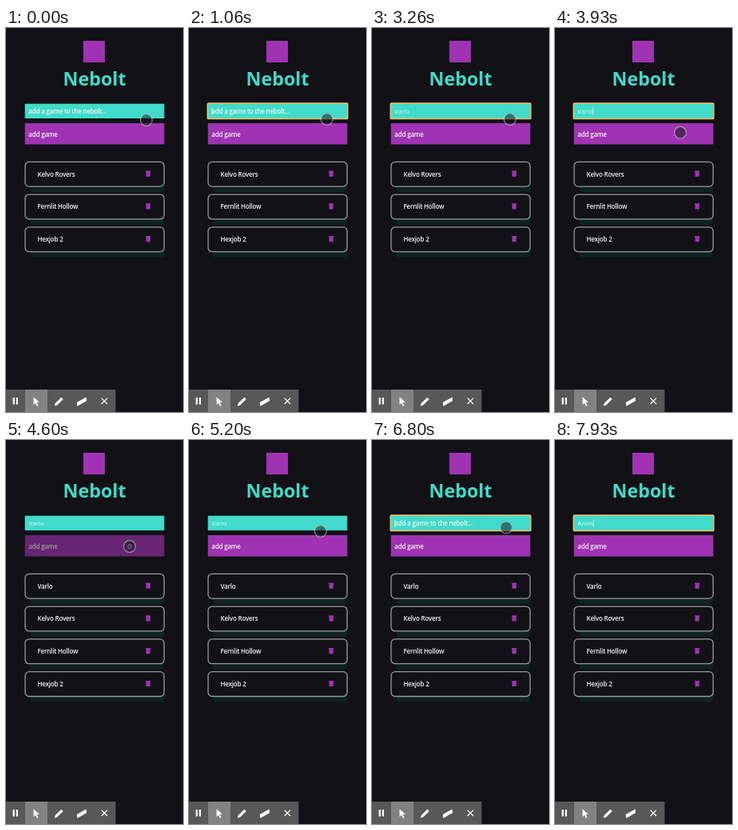
An HTML page for the animation above (8 s loop, 222 px wide and 480 px high).

```html
<!DOCTYPE html>
<html lang="en">
<head>
<meta charset="utf-8">
<title>Game list</title>
<style>
  html, body { margin: 0; width: 100%; height: 100%; overflow: hidden; background: #111116; }
  svg { display: block; width: 100vw; height: 100vh; }
  text { font: 600 8px "Open Sans", "Noto Sans", sans-serif; letter-spacing: -.2px; fill: #f4f4f6; }
  #title { font-size: 23.3px; font-weight: 700; letter-spacing: 0; fill: #40dbca; text-anchor: middle; }
  #field.typed { font-weight: 400; letter-spacing: 0; fill: #e0fbf7; }
</style>
</head>
<body>
<svg viewBox="0 0 222 480">
  <defs>
    <filter id="soft" x="-10%" y="-30%" width="120%" height="160%"><feGaussianBlur stdDeviation=".7"/></filter>
    <g id="card">
      <rect x="30.5" y="10" width="168" height="28" rx="3" fill="#10231f" filter="url(#soft)"/>
      <rect x="24" y=".3" width="174.3" height="30.8" rx="5" fill="#111116" stroke="#969b9b" stroke-width="1.3"/>
      <path d="M175.2 11.5h6.2v1.4h-.5v5.8h-5.2v-5.8h-.5z" fill="#a033b3"/>
    </g>
  </defs>
  <rect width="222" height="480" fill="#111116"/>
  <rect x="97" y="16" width="27" height="27" fill="#a033b3"/>
  <text id="title" x="111" y="72">Nebolt</text>

  <rect x="23.7" y="94.7" width="174.8" height="18.3" fill="#40dbca"/>
  <rect id="focus" x="23.3" y="94.2" width="175.7" height="19.2" rx="1" fill="none" stroke="#e3c06c" stroke-width="1.7"/>
  <text id="field" x="28.3" y="107"></text>
  <rect id="caret" y="99.5" width=".8" height="9" fill="#e0fbf7"/>

  <g id="button">
    <rect x="23.7" y="119" width="174.8" height="26.5" fill="#a033b3"/>
    <text x="28.3" y="135.5">add game</text>
  </g>

  <g id="list"></g>

  <g id="toolbar">
    <rect y="452" width="137.5" height="28" fill="#585858"/>
    <rect x="24" y="452" width="28" height="28" fill="#828282"/>
    <g fill="#fff">
      <path d="M8.6 462h2.2v8.5h-2.2zM12.7 462h2.2v8.5h-2.2z"/>
      <path d="M34.5 461.3l7.3 6.4-3.3.4 2 3.8-1.6.8-1.9-3.9-2.4 2.2z"/>
      <path d="M60.8 472.5l1-3.4 7.6-7.3 2.3 2.3-7.6 7.4z"/>
      <path d="M88.8 468l11.8-6.6.6 4.6-11.8 6.8z"/>
    </g>
    <path d="M119.7 462.6l7.4 7.4M127.1 462.6l-7.4 7.4" stroke="#fff" stroke-width="1.2"/>
  </g>

  <g id="pointer">
    <circle r="7.4" fill="#111820" fill-opacity=".52" stroke="#c8c4cc" stroke-opacity=".65" stroke-width="1.2"/>
    <circle id="press" fill="none" stroke="#c8b4cc"/>
  </g>
</svg>
<script>
const LOOP = 8000;
const HINT = "add a game to the nebolt...";
const NEW = "Varlo", NEXT = "Anim";
const GAMES = ["Kelvo Rovers", "Fernlit Hollow", "Hexjob 2"];

// key moments in ms
const FOCUS = 600, TYPE = 2270, PRESS = 4270, ADD = 4530, LEAVE = 5060;
const REFOCUS = 5800, ERASE = 6330, RETYPE = 7600;
const KEY_GAP = 120, NEXT_GAP = 105, ERASE_GAP = 65;

const START = { x: 176, y: 115 };
const MOVES = [
  { from: 0, to: 400, x: 173, y: 114 },
  { from: 3460, to: 4060, x: 155, y: 133 },
  { from: LEAVE, to: 5200, x: 165, y: 114 },
  { from: 6600, to: 6930, x: 170, y: 107 }
];

const $ = id => document.getElementById(id);
const show = (el, on) => el.setAttribute("visibility", on ? "visible" : "hidden");
const ramp = (t, from, to) => Math.min(1, Math.max(0, (t - from) / (to - from)));
const ease = p => p * p * (3 - 2 * p);
const keys = (t, start, gap) => Math.max(0, Math.floor((t - start) / gap) + 1);

function valueAt(t) {
  if (t >= RETYPE) return NEXT.slice(0, keys(t, RETYPE, NEXT_GAP));
  const left = NEW.length - keys(t, ERASE, ERASE_GAP);
  return NEW.slice(0, Math.max(0, Math.min(keys(t, TYPE, KEY_GAP), left)));
}

// the caret blinks afresh after each focus or key press
function caretAt(t) {
  const last = (start, gap, n) => t < start ? 0 : start + gap * (Math.min(n, keys(t, start, gap)) - 1);
  const since = t - Math.max(
    t < FOCUS ? 0 : FOCUS,
    last(TYPE, KEY_GAP, NEW.length),
    t < REFOCUS ? 0 : REFOCUS,
    last(ERASE, ERASE_GAP, NEW.length),
    last(RETYPE, NEXT_GAP, NEXT.length));
  return since % 1000 < 500;
}

function pointerAt(t) {
  return MOVES.reduce((p, m) => {
    const k = ease(ramp(t, m.from, m.to));
    return { x: p.x + (m.x - p.x) * k, y: p.y + (m.y - p.y) * k };
  }, START);
}

const cards = Array.from({ length: GAMES.length + 1 }, (_, i) => {
  const g = document.createElementNS("http://www.w3.org/2000/svg", "g");
  g.setAttribute("transform", `translate(0 ${167 + i * 40.8})`);
  g.innerHTML = '<use href="#card"/><text x="39.5" y="18.6"></text>';
  $("list").append(g);
  return g;
});

function draw(t) {
  const value = valueAt(t), field = $("field");
  const focused = t >= FOCUS && t < PRESS || t >= REFOCUS;
  field.textContent = value || HINT;
  field.setAttribute("class", value ? "typed" : "");
  show($("focus"), focused);
  show($("caret"), focused && caretAt(t));
  $("caret").setAttribute("x", 28.4 + (value ? field.getComputedTextLength() : 0));
  $("button").setAttribute("opacity", 1 - .4 * (ramp(t, PRESS, PRESS + 70) - ramp(t, LEAVE, LEAVE + 130)));

  const games = t < ADD ? GAMES : [NEW, ...GAMES];
  cards.forEach((card, i) => {
    show(card, i < games.length);
    card.lastChild.textContent = games[i] || "";
  });

  const { x, y } = pointerAt(t), press = ramp(t, ADD, ADD + 270);
  $("pointer").setAttribute("transform", `translate(${x} ${y})`);
  show($("pointer"), t < RETYPE);
  show($("press"), t < RETYPE && press > 0 && press < 1);
  $("press").setAttribute("r", 1 + press * 5);
  $("press").setAttribute("stroke-opacity", .9 * (1 - press));
}

function tick() {
  draw(performance.now() % LOOP);
  requestAnimationFrame(tick);
}
tick();
</script>
</body>
</html>
```
